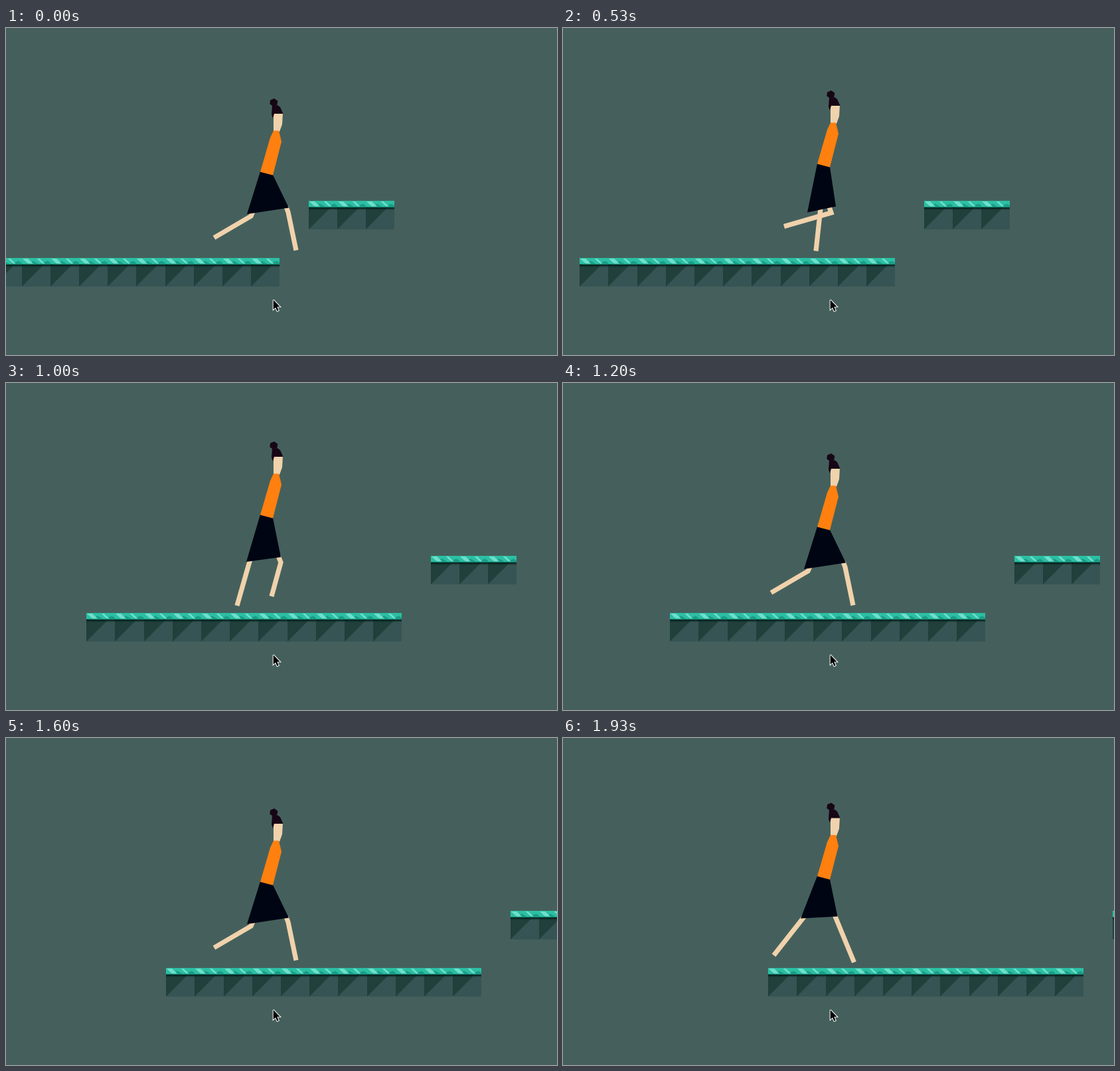
Animation of 830x492 px, one loop 2000 ms. Source, as an HTML page with a canvas:

```html
<!DOCTYPE html>
<html lang="en">
<head>
<meta charset="utf-8">
<title>Walk</title>
<style>
html, body { margin: 0; width: 100%; height: 100%; overflow: hidden; background: #45605c; }
canvas { display: block; }
</style>
</head>
<body>
<canvas id="stage" width="830" height="492"></canvas>
<script>
const ctx = document.getElementById('stage').getContext('2d');
const LOOP = 2000, STEPS = 30, TILE = 43.2, TICK = 4, STRIDE = 79;
const SKIN = '#f0d2ac', HAIR = '#170616', SHIRT = '#ff800f', SKIRT = '#000514';

// Key points of the scroll: [step, distance].
const SCROLL = [[0, 0], [4, 40], [8, 88], [16, 200], [29, 372]];

// One stride: body lift, skirt hem, and each leg from hip to foot.
const POSES = [
  { lift: 0, hem: [[426, 270.5], [363, 280]],
    legs: [[[372, 276], [369, 283], [313.5, 315.5]], [[422, 269], [425, 277], [437, 334.5]]] },
  { lift: 12, hem: [[411, 268.5], [368, 277.5]],
    legs: [[[388, 271], [381, 335.5]], [[401, 269], [404, 278], [333, 298.5]]] },
  { lift: 18, hem: [[414, 262], [362, 269]],
    legs: [[[368, 265], [348, 335]], [[410, 260], [414, 270], [400, 321]]] },
  { lift: 8.5, hem: [[413.5, 268.5], [358, 271.5]],
    legs: [[[364, 268], [317.5, 327]], [[409, 266], [438.5, 337.5]]] }
];

function trace(points) {
  ctx.beginPath();
  points.forEach(([x, y]) => ctx.lineTo(x, y));
}

function poly(color, points) {
  ctx.fillStyle = color;
  trace(points);
  ctx.fill();
}

function line(color, width, points) {
  ctx.strokeStyle = color;
  ctx.lineWidth = width;
  trace(points);
  ctx.stroke();
}

function rect(color, x, y, w, h) {
  ctx.fillStyle = color;
  ctx.fillRect(x, y, w, h);
}

function at(x, y, paint) {
  ctx.save();
  ctx.translate(x, y);
  paint();
  ctx.restore();
}

function streak(color, x, top, bottom, width, slant) {
  poly(color, [[x, top], [x + width, top], [x + width + slant, bottom], [x + slant, bottom]]);
}

function tile(w) {
  ctx.beginPath();
  ctx.rect(0, 0, w, 43);
  ctx.clip();
  rect('#365453', 0, 0, w, 43);
  poly('#213f3b', [[0, 9], [34, 9], [0, 43]]);
  const shade = ctx.createLinearGradient(0, 9, 0, 14);
  shade.addColorStop(0, '#02201b');
  shade.addColorStop(0.4, 'rgba(2,32,27,.85)');
  shade.addColorStop(1, 'rgba(2,32,27,0)');
  rect(shade, 0, 9, w, 5);
  rect('#2bbfa4', 0, 0, w, 9.5);
  for (let x = 0; x < TILE; x += TILE / 2) {
    poly('#1b9c87', [[x + 4, 9.5], [x + 17, 4.5], [x + 26, 9.5]]);
    streak('#70dfca', x + 1, 1, 8.5, x ? 4 : 8, 8);
  }
}

function platform(x, y, count) {
  for (let i = 0; i < count; i++) {
    const left = Math.round(x + i * TILE);
    at(left, y, () => tile(Math.round(x + (i + 1) * TILE) - left));
  }
}

function body() {
  poly(SKIN, [[403, 128], [417, 128], [416, 145], [412, 156], [403, 156]]);
  poly(SHIRT, [[403, 154.5], [411, 154.5], [415, 171], [402, 221.5], [383, 216.5], [398, 165]]);
  poly(HAIR, [[401, 117], [409, 116], [413, 119], [417.5, 129], [404, 129], [402, 136], [400, 130]]);
  const bun = Array.from({ length: 6 }, (_, i) => [403.3 + 6.5 * Math.cos(i * Math.PI / 3 - 0.4), 112 + 6 * Math.sin(i * Math.PI / 3 - 0.4)]);
  poly(HAIR, bun);
}

function walker({ lift, hem, legs }) {
  legs.forEach(leg => line(SKIN, 7.2, leg));
  poly(SKIRT, [[383, 216 - lift], [402, 221 - lift], ...hem]);
  at(0, -lift, body);
}

function pointer() {
  const arrow = [[0, 0], [0, 14.5], [3.3, 11.5], [5.8, 17], [8, 16], [5.6, 10.6], [10, 10.4], [0, 0]];
  line('#fff', 2, arrow);
  poly('#000', arrow);
}

function scrollAt(step) {
  const i = Math.max(1, SCROLL.findIndex(([s]) => s >= step));
  const [s0, d0] = SCROLL[i - 1], [s1, d1] = SCROLL[i];
  const distance = d0 + (d1 - d0) * (step - s0) / (s1 - s0);
  return TICK * Math.floor(distance / TICK);
}

function draw(ms) {
  const step = Math.floor((ms % LOOP + 3.4) * STEPS / LOOP) % STEPS;
  const shift = scrollAt(step);
  const phase = (shift + 19.5) / STRIDE % 1;
  rect('#45605c', 0, 0, 830, 492);
  platform(shift - 62.8, 346, 11);
  platform(shift + 455.7, 260, 3);
  walker(POSES[Math.floor(phase * POSES.length)]);
  at(402.7, 409, pointer);
}

const start = performance.now();
function loop() {
  draw(performance.now() - start);
  requestAnimationFrame(loop);
}
loop();
</script>
</body>
</html>
```
